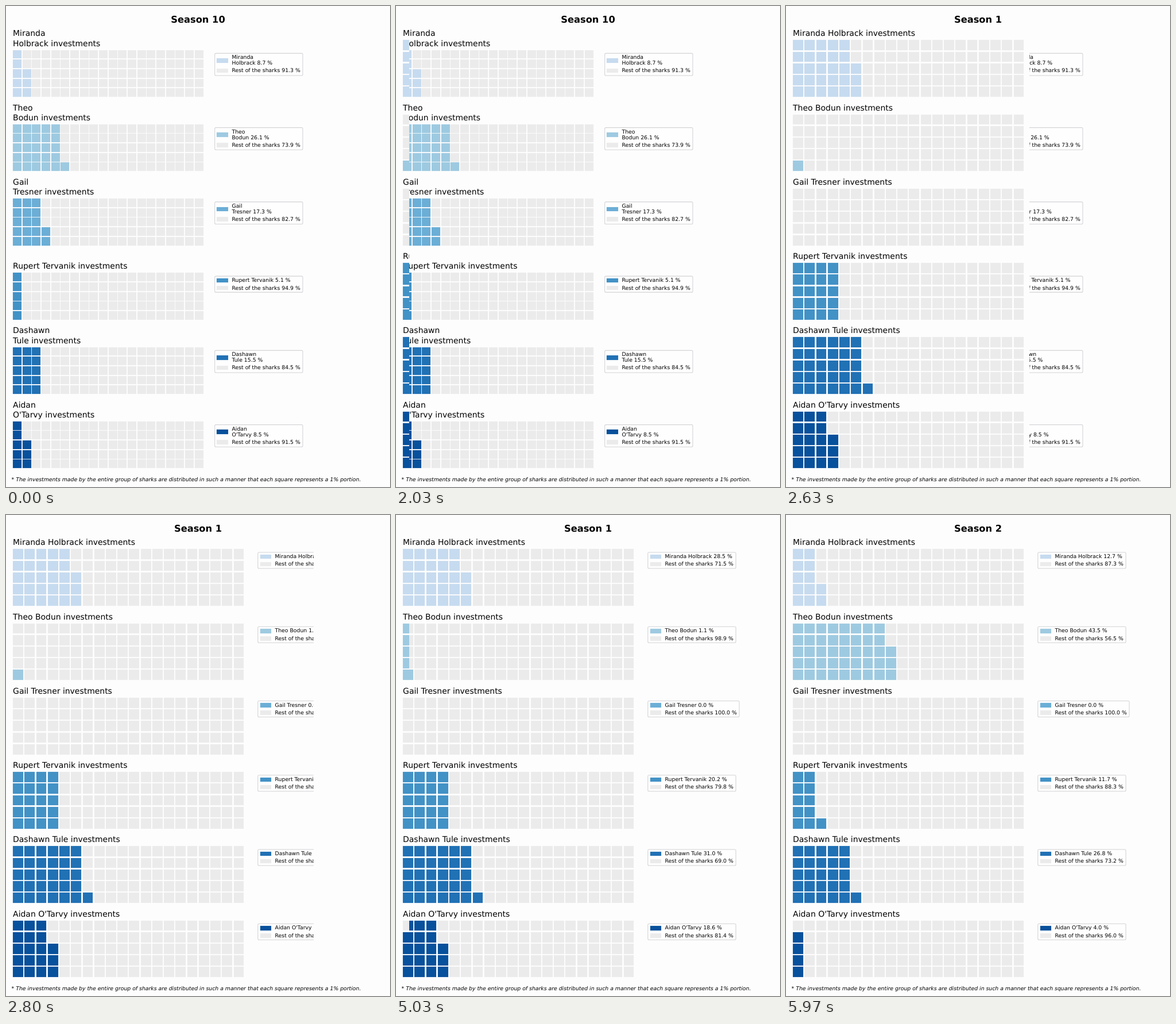
An HTML page that plays this animation: 669x837 px, repeating every 8000 ms.

```html
<!DOCTYPE html>
<html lang="en">
<head>
<meta charset="utf-8">
<title>Investments by season</title>
<style>
  html, body { margin: 0; width: 100%; height: 100%; overflow: hidden; background: #fdfdfd; }
  svg { position: absolute; left: 0; top: 0; background: #fdfdfd; }
  text { font-family: "DejaVu Sans", Verdana, sans-serif; fill: #000; text-rendering: geometricPrecision; }
  .head { font-size: 16.27px; font-weight: bold; text-anchor: middle; }
  .name { font-size: 13.94px; }
  .key { font-size: 9.3px; }
  .note { font-size: 9.3px; font-style: italic; }
  .box { fill: #fefefe; stroke: #d4d4d8; stroke-width: 1.1; }
</style>
</head>
<body>
<script>
const W = 669, H = 837, LOOP = 8000;
const PITCH = 129.25, LEFT = 12.1, BOTTOM = 157.1, ROWS = 5, COLS = 20;
const EM = 9.3, LINE = 1.16, REST = '#ebebeb';

const people = [
  ['Miranda', 'Holbrack', '#c6dbef'],
  ['Theo', 'Bodun', '#9ecae1'],
  ['Gail', 'Tresner', '#6baed6'],
  ['Rupert', 'Tervanik', '#4292c6'],
  ['Dashawn', 'Tule', '#2171b5'],
  ['Aidan', "O'Tarvy", '#08519c']
];
const ONE_LINE = 3; // this name never wraps

// wipe: when the season starts sweeping in from the left
const seasons = [
  { no: 10, share: [8.7, 26.1, 17.3, 5.1, 15.5, 8.5], width: 330.6, keyX: 363.7, keyY: 82.4, wrap: true },
  { no: 1, share: [28.5, 1.1, 0, 20.2, 31, 18.6], width: 401.3, keyX: 438.8, keyY: 65, wipe: 2000 },
  { no: 2, share: [12.7, 43.5, 0, 11.7, 26.8, 4], width: 401.3, keyX: 438.8, keyY: 65, wipe: 5000 }
];

function add(parent, tag, attrs, content) {
  const el = document.createElementNS('http://www.w3.org/2000/svg', tag);
  for (const key in attrs) el.setAttribute(key, attrs[key]);
  if (content) el.textContent = content;
  parent.appendChild(el);
  return el;
}

function label(svg, cls, x, y, content) {
  add(svg, 'text', { class: cls, x, y: Math.round(y) }, content);
}

// Outlined rectangle whose border sits on pixel centres
function block(svg, x, y, w, h, color) {
  const x0 = Math.round(x), y0 = Math.round(y);
  add(svg, 'rect', {
    x: x0 + 0.5, y: y0 + 0.5, fill: color, stroke: color, 'stroke-width': LINE,
    width: Math.round(x + w) - x0, height: Math.round(y + h) - y0
  });
}

function drawGrid(svg, bottom, width, count, color) {
  const cell = width / (COLS + 0.2 * (COLS - 1)), step = cell * 1.2;
  for (let i = 0; i < ROWS * COLS; i++) {
    const col = Math.floor(i / ROWS), row = i % ROWS;
    block(svg, LEFT + col * step, bottom - cell - row * step, cell, cell,
      i < count ? color : REST);
  }
}

function drawKey(svg, x, y, lines, share, color) {
  const tall = lines.length > 1;
  const rest = `Rest of the sharks ${(100 - share).toFixed(1)} %`;
  const textX = x + 3.2 * EM;
  const restY = y + (tall ? 33 : 23.4);
  const swatch = (top, fill) => block(svg, x + 0.4 * EM, top, 2 * EM, 0.7 * EM, fill);
  add(svg, 'rect', {
    class: 'box', x, y, rx: 2,
    width: 153.3 + (share === 0 ? 5.9 : 0), height: tall ? 38.6 : 28
  });
  swatch(y + (tall ? 8.8 : 3.8), color);
  swatch(restY - 6.6, REST);
  lines.forEach((line, i) => {
    const end = i === lines.length - 1 ? ` ${share.toFixed(1)} %` : '';
    label(svg, 'key', textX, y + 10 + i * 10, line + end);
  });
  label(svg, 'key', textX, restY, rest);
}

function drawSeason(s) {
  const svg = add(document.body, 'svg', { width: W, height: H, viewBox: `0 0 ${W} ${H}` });
  label(svg, 'head', W / 2, 29, `Season ${s.no}`);
  people.forEach(([first, last, color], i) => {
    const dy = i * PITCH;
    const wraps = s.wrap && i !== ONE_LINE;
    const lines = wraps ? [first, last] : [`${first} ${last}`];
    const top = 52.4 + dy;
    if (wraps) label(svg, 'name', LEFT, top, first);
    label(svg, 'name', LEFT, s.wrap ? top + 17.3 : top, `${lines[lines.length - 1]} investments`);
    drawGrid(svg, BOTTOM + dy, s.width, Math.floor(s.share[i]), color);
    drawKey(svg, s.keyX, s.keyY + dy, lines, s.share[i], color);
  });
  label(svg, 'note', 9.6, 827, '* The investments made by the entire group of sharks are distributed in ' +
    'such a manner that each square represents a 1% portion.');
  return svg;
}

// One second of 30 hard steps, on a 10 ms clock
function wipeFrames(start) {
  const steps = 30, frames = [];
  const push = (time, edge) => frames.push({
    offset: time / LOOP, easing: 'steps(1, end)',
    clipPath: `inset(0px ${W - edge}px 0px 0px)`
  });
  push(0, 0);
  for (let k = 1; k <= steps; k++) {
    const time = start + Math.round(k * 100 / steps) * 10;
    push(time, Math.min(W, Math.floor(k * W / steps) + 1));
  }
  push(LOOP, W);
  return frames;
}

for (const s of seasons) {
  const svg = drawSeason(s);
  if (s.wipe) svg.animate(wipeFrames(s.wipe), { duration: LOOP, iterations: Infinity });
}
</script>
</body>
</html>
```
